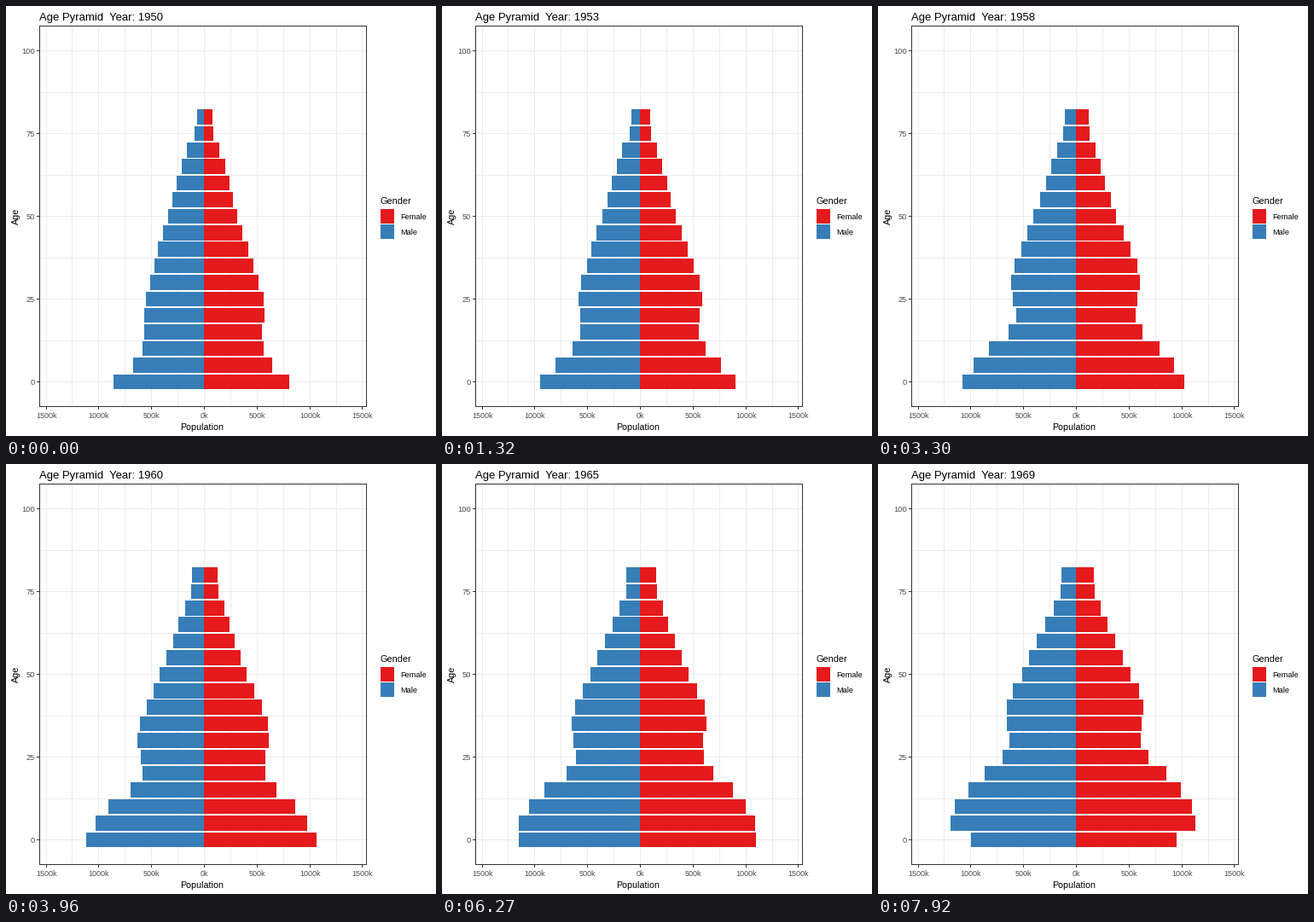
Animation of 504x504 px, one loop 8000 ms. Source, as a matplotlib script:

```python
import numpy as np
import matplotlib.pyplot as plt
from matplotlib.animation import FuncAnimation
from matplotlib.patches import Rectangle

SIZE = 504
LOOP, TICK, STEP = 8000, 20, 330
RED, BLUE = "#E41A1C", "#377EB8"
GRID, DARK, LABEL = "#EBEBEB", "#333333", "#4D4D4D"
LEFT, RIGHT, TOP, BOTTOM = 39, 422, 23, 469
ZERO_X, X_STEP = 232, 30.905        # x of zero, pixels per 250k
ZERO_Y, PER_YEAR = 440.33, 3.879

# Bar length = size of the cohort at its birth year + a gain or loss with age.
# Birth years count from 1950; lengths are in pixels.
BIRTHS = [-80, -70, -60, -50, -40, -30, -25, -20, -15, -10, -5, 0, 5, 10, 15, 19]
AGES = [0, 10, 20, 30, 40, 50, 60, 70, 75, 80]
MALE = ([18, 24, 27, 31.5, 42, 55, 64.5, 69.5, 70.5, 71.5, 86, 112, 129.5, 144.5, 148.5, 129],
        [-6, 0, 0, 8, 12, 10, 5, -4.5, -10.5, -10])
FEMALE = ([12, 18.5, 24, 30, 41, 56.5, 65, 68, 66.5, 69.5, 83.5, 107, 124.5, 138.5, 142, 124.5],
          [-6.5, 0, 3, 8, 11, 9, 6, 0, -4, -2])
GROUPS = np.arange(0, 81, 5)

# Each year lands on a whole step; 80 years span 99 steps.
YEARS = np.arange(21)
YEAR_STEPS = np.round(YEARS * 99 / 80)


def curve(knots, values, x):
    """Smooth cubic curve through the key points."""
    knots, values = np.array(knots, float), np.array(values, float)
    slope = np.gradient(values, knots)
    k = np.clip(np.searchsorted(knots, x, side="right") - 1, 0, len(knots) - 2)
    h = knots[k + 1] - knots[k]
    t = (x - knots[k]) / h
    return ((1 + 2 * t) * (1 - t) ** 2 * values[k] + t * (1 - t) ** 2 * h * slope[k]
            + t * t * (3 - 2 * t) * values[k + 1] + t * t * (t - 1) * h * slope[k + 1])


def lengths(sex, year):
    cohort, change = sex
    total = curve(BIRTHS, cohort, year - GROUPS) + curve(AGES, change, GROUPS)
    return np.round(total).astype(int)


def pose(step):
    year = np.interp(step, YEAR_STEPS, YEARS)
    shown = 1950 + round(step * 80 / 99)
    return lengths(MALE, year), lengths(FEMALE, year), shown


POSES = [pose(s) for s in range(LOOP // STEP + 1)]

plt.rcParams["font.family"] = "Liberation Sans"
fig = plt.figure(figsize=(SIZE / 72, SIZE / 72), dpi=72, facecolor="white")
ax = fig.add_axes([0, 0, 1, 1])
ax.set_xlim(0, SIZE)
ax.set_ylim(SIZE, 0)
ax.axis("off")


def box(x, y, w, h, color, z=1):
    return ax.add_patch(Rectangle((x, y), w, h, facecolor=color, linewidth=0,
                                  antialiased=False, zorder=z))


def label(x, y, text, size, color="black", va="baseline", **kw):
    return ax.text(x, y, text, fontsize=size, color=color, va=va, **kw)


# Grid, ticks and tick labels
for k in range(-6, 7):
    x = round(ZERO_X + k * X_STEP)
    box(x, TOP, 1, BOTTOM - TOP, GRID)
    if k % 2 == 0:
        box(x, BOTTOM + 1, 1, 3, DARK)
        label(x + 0.5, 483, f"{abs(k) * 250}k", 9, LABEL, ha="center")
for k in range(9):
    y = round(ZERO_Y - k * 12.5 * PER_YEAR)
    box(LEFT, y, RIGHT - LEFT, 1, GRID)
    if k % 2 == 0:
        box(LEFT - 3, y, 3, 1, DARK)
        label(34, y + 4, f"{k * 25 // 2}", 9.2, LABEL, ha="right")

# Panel border
for y in (TOP, BOTTOM):
    box(LEFT, y, RIGHT - LEFT + 1, 1, DARK, 4)
for x in (LEFT, RIGHT):
    box(x, TOP, 1, BOTTOM - TOP + 1, DARK, 4)

# Titles and legend
title = label(39, 17, "", 13.1)
label(229.5, 497, "Population", 10.6, ha="center")
label(17, 246.5, "Age", 10.7, rotation=90, ha="right", va="center")
label(438.5, 232, "Gender", 10.9)
for y, color, name in ((238, RED, "Female"), (256, BLUE, "Male")):
    box(439, y, 16, 17, color)
    label(462, y + 12.5, name, 9.3)

male_bars, female_bars = [], []
for age in GROUPS:
    mid, half = ZERO_Y - age * PER_YEAR, 2.25 * PER_YEAR
    y0, y1 = round(mid - half), round(mid + half)
    male_bars.append(box(ZERO_X, y0, 0, y1 - y0, BLUE, 3))
    female_bars.append(box(ZERO_X, y0, 0, y1 - y0, RED, 3))


def update(n):
    male, female, year = POSES[(n * TICK + TICK // 2) // STEP]
    for bar, w in zip(male_bars, male):
        bar.set_x(ZERO_X - w)
        bar.set_width(w)
    for bar, w in zip(female_bars, female):
        bar.set_width(w)
    title.set_text(f"Age Pyramid  Year: {year}")
    return [*male_bars, *female_bars, title]


anim = FuncAnimation(fig, update, frames=LOOP // TICK, interval=TICK,
                     init_func=lambda: update(0), repeat=True, repeat_delay=0)
plt.show()
```
